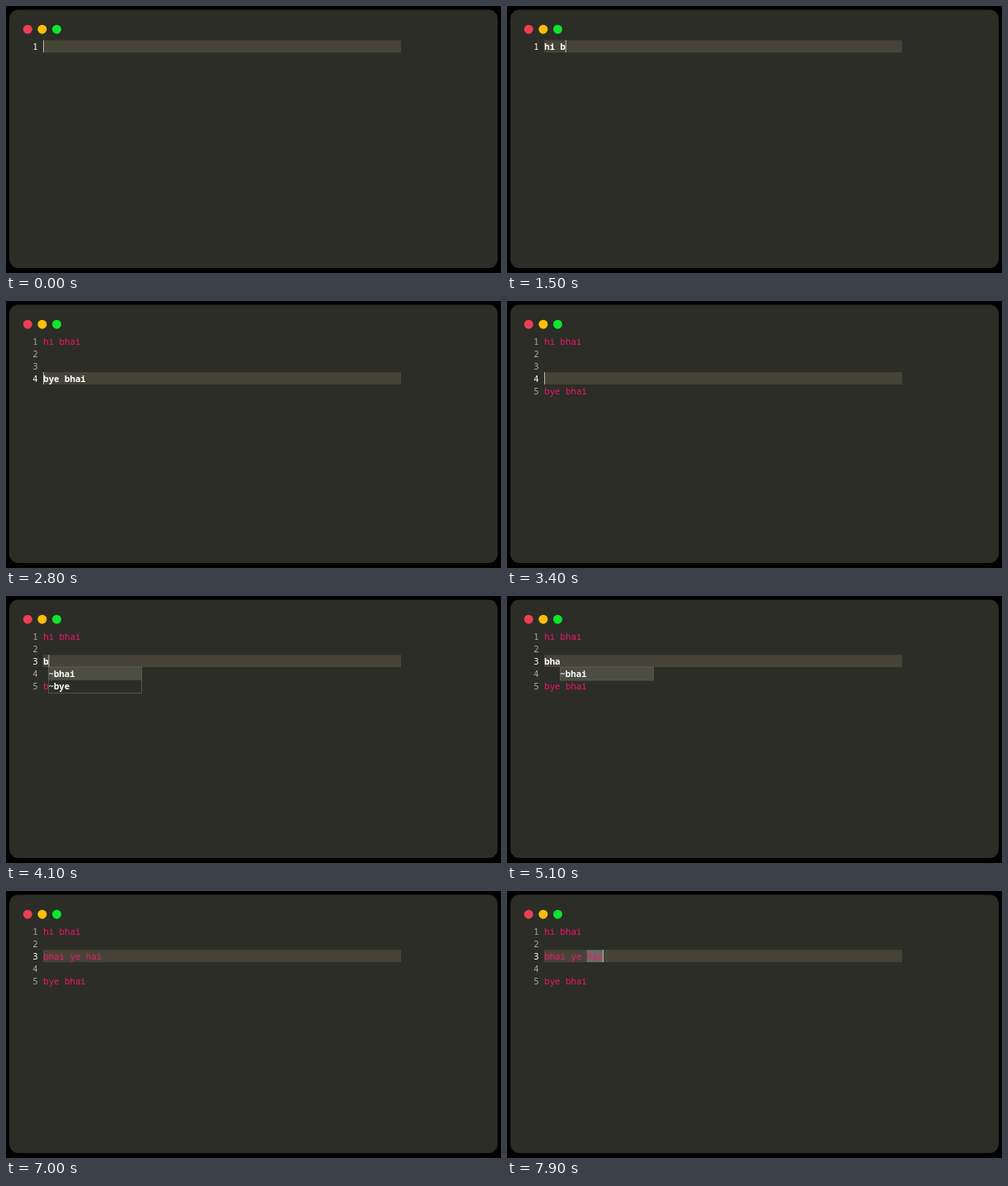
An HTML page with a canvas that plays this animation: 600 px wide and 323 px high, repeating every 8000 ms.

```html
<!DOCTYPE html>
<html lang="en">
<head>
<meta charset="utf-8">
<title>Code editor</title>
<style>
  html, body { margin: 0; width: 100%; height: 100%; overflow: hidden; background: #000; }
  canvas { display: block; width: 600px; height: 323px; }
</style>
</head>
<body>
<canvas id="stage" width="600" height="323"></canvas>
<script>
const canvas = document.getElementById('stage');
const ctx = canvas.getContext('2d');
const dpr = window.devicePixelRatio || 1;
canvas.width = 600 * dpr;
canvas.height = 323 * dpr;

const LOOP = 8000, BLINK = 500, HIGHLIGHT_LAG = 200;
const LEFT = 45.2, RIGHT = 479, TOP = 41.4, PITCH = 14.9, CHAR = 6.45;
const FAMILY = '"Noto Sans Mono", "DejaVu Sans Mono", monospace';
const WHITE = '#ffffff', PINK = '#f5146f', GREY = '#a9aaa4';
const KEYWORDS = /(hi bhai|bye bhai|bhai ye hai)/;

// [time, key]: single characters are typed, words are commands
const KEYS = [
  [600, 'h'], [900, 'i'], [1100, ' '], [1400, 'b'], [1700, 'h'], [1900, 'a'], [2000, 'i'],
  [2300, 'enter'], [2500, 'enter'], [2800, 'enter'], [3100, 'enter'],
  [3300, 'up'], [3600, 'up'],
  [4000, 'b'], [4300, 'h'], [4600, 'a'], [5500, 'i'], [5700, ' '],
  [5800, 'y'], [6000, 'e'], [6200, ' '], [6300, 'h'], [6400, 'a'], [6500, 'i'],
  [7600, 'select']
];

function press(s, key, time) {
  const line = s.lines[s.row];
  const before = line.slice(0, s.col), after = line.slice(s.col);
  s.last = time;
  if (key === 'up') {
    s.row--;
  } else if (key === 'select') {
    s.from = line.lastIndexOf(' ') + 1;
  } else if (key === 'enter') {
    s.lines.splice(s.row, 1, before, after);
    s.row++;
    s.col = 0;
    s.edit = time;
  } else {
    const typed = before + key;
    const close = typed === 'hi bhai' ? 'bye bhai' : '';
    s.lines[s.row] = typed + close + after;
    s.col++;
    s.edit = time;
  }
}

function stateAt(t) {
  const s = { lines: [''], row: 0, col: 0, last: 0, edit: -1000, from: -1 };
  for (const [time, key] of KEYS) if (time <= t) press(s, key, time);
  return s;
}

function suggestions(s) {
  const line = s.lines[s.row];
  if (s.row !== 2 || !line) return [];
  return ['bhai', 'bye'].filter(word => word.startsWith(line));
}

function box(x, y, w, h, color) {
  ctx.fillStyle = color;
  ctx.fillRect(x, y, w, h);
}

function text(str, x, y, color, weight) {
  ctx.font = `${weight} 10.75px ${FAMILY}`;
  ctx.fillStyle = color;
  ctx.fillText(str, x, y);
}

const lineTop = row => TOP + row * PITCH;
const baseline = row => lineTop(row) + 11.6;
const column = col => LEFT + col * CHAR;

function drawWindow() {
  box(0, 0, 600, 323, '#000');
  ctx.fillStyle = '#2b2d26';
  ctx.beginPath();
  ctx.roundRect(4, 4.5, 592, 312.5, 11);
  ctx.fill();
  ['#ee3e54', '#ffbf05', '#0ce62b'].forEach((color, i) => {
    ctx.fillStyle = color;
    ctx.beginPath();
    ctx.arc(26.3 + i * 17.6, 28.2, 5.5, 0, Math.PI * 2);
    ctx.fill();
  });
}

function drawLine(line, row, plain) {
  const parts = plain ? [line] : line.split(KEYWORDS);
  let col = 0;
  for (const part of parts) {
    const keyword = !plain && KEYWORDS.test(part);
    text(part, column(col), baseline(row), keyword ? PINK : WHITE, keyword ? 500 : 600);
    col += part.length;
  }
}

function drawPopup(s) {
  const words = suggestions(s);
  if (!words.length) return;
  const x = column(s.col) - 0.2, y = lineTop(s.row + 1) - 0.2, h = words.length * 15.5 + 0.6;
  box(x, y, 113, h, '#2b2d26');
  box(x, y, 113, 16, '#4a4d40');
  words.forEach((word, i) => text('~' + word, x, y + 11.8 + i * 15.5, WHITE, 600));
  ctx.strokeStyle = '#66685a';
  ctx.lineWidth = 0.7;
  ctx.strokeRect(x, y, 113, h);
}

function draw(t) {
  const s = stateAt(t);
  ctx.setTransform(dpr, 0, 0, dpr, 0, 0);
  drawWindow();
  box(45, lineTop(s.row), RIGHT - 45, PITCH, '#464437');
  if (s.from >= 0) {
    box(column(s.from), lineTop(s.row) + 0.3, (s.col - s.from) * CHAR, PITCH - 0.3, '#6c6b65');
  }
  s.lines.forEach((line, row) => {
    const active = row === s.row;
    ctx.textAlign = 'right';
    text(row + 1, 38.8, baseline(row), active ? WHITE : GREY, active ? 500 : 400);
    ctx.textAlign = 'left';
    drawLine(line, row, active && t - s.edit < HIGHLIGHT_LAG);
  });
  if (Math.floor((t - s.last) / BLINK) % 2 === 0) {
    box(column(s.col) - 0.2, lineTop(s.row), 0.9, PITCH, '#c4c4bc');
  }
  drawPopup(s);
}

function tick() {
  draw(performance.now() % LOOP);
  requestAnimationFrame(tick);
}
tick();
</script>
</body>
</html>
```
